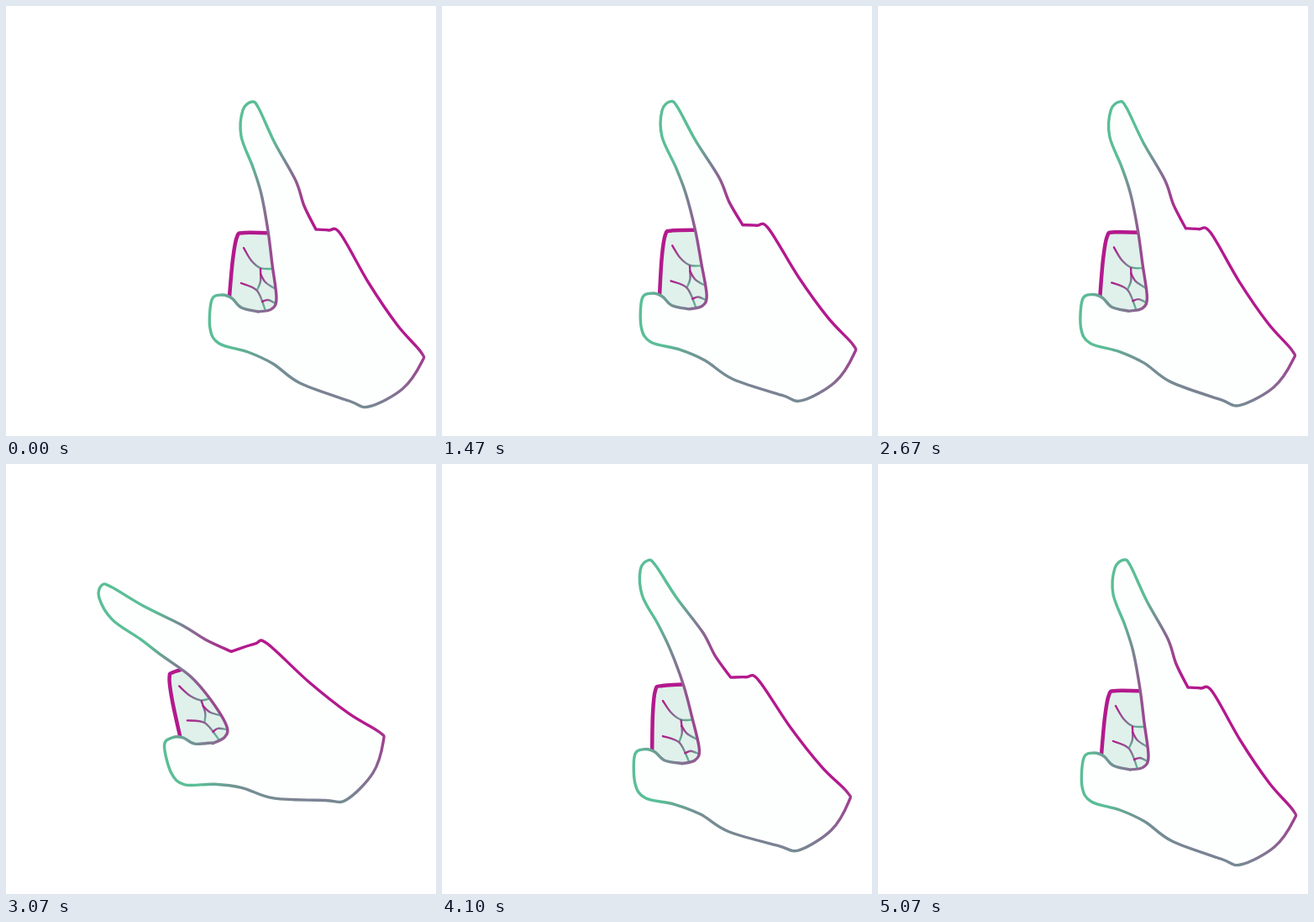
Write an HTML page with a canvas that moves like this. It is 512 px wide and 512 px high and loops after 5110 ms.

```html
<!DOCTYPE html>
<html lang="en">
<head>
<meta charset="utf-8">
<title>Tapping hand</title>
<style>
  html, body { margin: 0; width: 100%; height: 100%; overflow: hidden; background: #fff; }
  canvas { display: block; }
</style>
</head>
<body>
<canvas id="stage" width="512" height="512"></canvas>
<script>
const ctx = document.getElementById('stage').getContext('2d');
const LOOP = 5110, TAPS = 4, STEPS = 16, HIT = 7, REST = 15;
const MAGENTA = '#b3198d', GREEN = '#5abe96';
const KNUCKLE = [368, 336], WRIST = [510, 379];

// Key points of the resting hand
const finger = [
  [300, 364], [316, 361], [322, 348], [317, 308], [312, 268], [304, 224], [294, 192],
  [280, 155], [282, 124], [293, 114], [301, 122], [320, 163], [345, 208], [355, 238], [369, 266]
];
const fist = [
  [369, 266], [384, 267], [398, 271], [432, 330], [466, 380], [494, 412], [495, 424],
  [472, 456], [432, 477], [408, 470], [350, 449], [318, 426], [288, 412], [254, 402],
  [243, 384], [245, 350], [257, 344], [269, 348], [280, 359], [300, 364]
];
const palm = [[330, 271], [284, 270], [275, 275], [270, 302], [266, 346]];
const creases = [
  [[283, 288], [292, 303], [303, 312], [316, 313]],
  [[303, 313], [303, 328], [299, 338]],
  [[303, 319], [309, 329], [321, 337]],
  [[280, 330], [299, 339], [309, 363]],
  [[305, 352], [312, 350], [321, 354]]
];

// Speeds up into the tap, slows down on the way back
function swing(step) {
  return 1.38 * (step <= HIT
    ? (step / HIT) ** 2.09
    : Math.max(0, (REST - step) / (REST - HIT)) ** 1.6);
}

function rotate([x, y], [cx, cy], degrees) {
  const a = -degrees * Math.PI / 180, c = Math.cos(a), s = Math.sin(a);
  x -= cx; y -= cy;
  return [cx + x * c - y * s, cy + x * s + y * c];
}

// Turn about the wrist while the wrist slides up and left
function turn(point, u) {
  const [x, y] = rotate(point, WRIST, 17.5 * u);
  return [x - 60 * u, y - 96 * u];
}

// The finger bends more towards its tip
function bend(point, u) {
  const share = Math.max(0, Math.min(1, (372 - point[1]) / 150));
  return rotate(point, KNUCKLE, 17 * share * u);
}

// Add a smooth curve through the points to the path
function curve(points) {
  const at = i => points[Math.max(0, Math.min(points.length - 1, i))];
  ctx.lineTo(...points[0]);
  for (let i = 0; i < points.length - 1; i++) {
    const [a, b, c, d] = [at(i - 1), at(i), at(i + 1), at(i + 2)];
    ctx.bezierCurveTo(
      b[0] + (c[0] - a[0]) / 6, b[1] + (c[1] - a[1]) / 6,
      c[0] - (d[0] - b[0]) / 6, c[1] - (d[1] - b[1]) / 6, ...c);
  }
}

function fill(style) {
  ctx.fillStyle = style;
  ctx.fill();
}

function stroke(style, width) {
  ctx.strokeStyle = style;
  ctx.lineWidth = width;
  ctx.stroke();
}

function blend(gradient) {
  gradient.addColorStop(0, MAGENTA);
  gradient.addColorStop(1, GREEN);
  return gradient;
}

// Rays fly outwards after the tap and shrink away
function drawRays(step) {
  const left = (12 - step) ** 2;
  const inner = 106 - 4.25 * left, outer = 108 - .75 * left;
  ctx.beginPath();
  for (let i = 0; i < 8; i++) {
    const a = i * Math.PI / 4 - .02, c = Math.cos(a), s = Math.sin(a);
    ctx.moveTo(113 + inner * c, 165 + inner * s);
    ctx.lineTo(113 + outer * c, 165 + outer * s);
  }
  stroke('#00aaff', 10.5);
}

function drawHand(u) {
  const place = points => points.map(p => turn(p, u));

  ctx.beginPath();
  curve(place([...palm, [290, 368], [330, 368]]));
  fill('#dff1ea');
  for (const line of creases) {
    const points = place(line);
    ctx.beginPath();
    curve(points);
    stroke(blend(ctx.createLinearGradient(...points[0], ...points[points.length - 1])), 2.4);
  }
  ctx.beginPath();
  curve(place(palm));
  stroke(MAGENTA, 4.5);

  const centre = turn([445, 310], u);
  ctx.beginPath();
  curve(place(finger.map(p => bend(p, u))));
  curve(place(fist.map((p, i) => i ? p : bend(p, u))));
  ctx.closePath();
  fill('#fdfefe');
  stroke(blend(ctx.createRadialGradient(...centre, 100, ...centre, 200)), 3.4);
}

function draw() {
  const t = performance.now() % LOOP;
  const step = Math.floor(t / LOOP * TAPS * STEPS) % STEPS;
  ctx.clearRect(0, 0, 512, 512);
  ctx.lineCap = ctx.lineJoin = 'round';
  if (step > HIT && step < 12) drawRays(step);
  drawHand(swing(step));
  requestAnimationFrame(draw);
}
draw();
</script>
</body>
</html>
```
